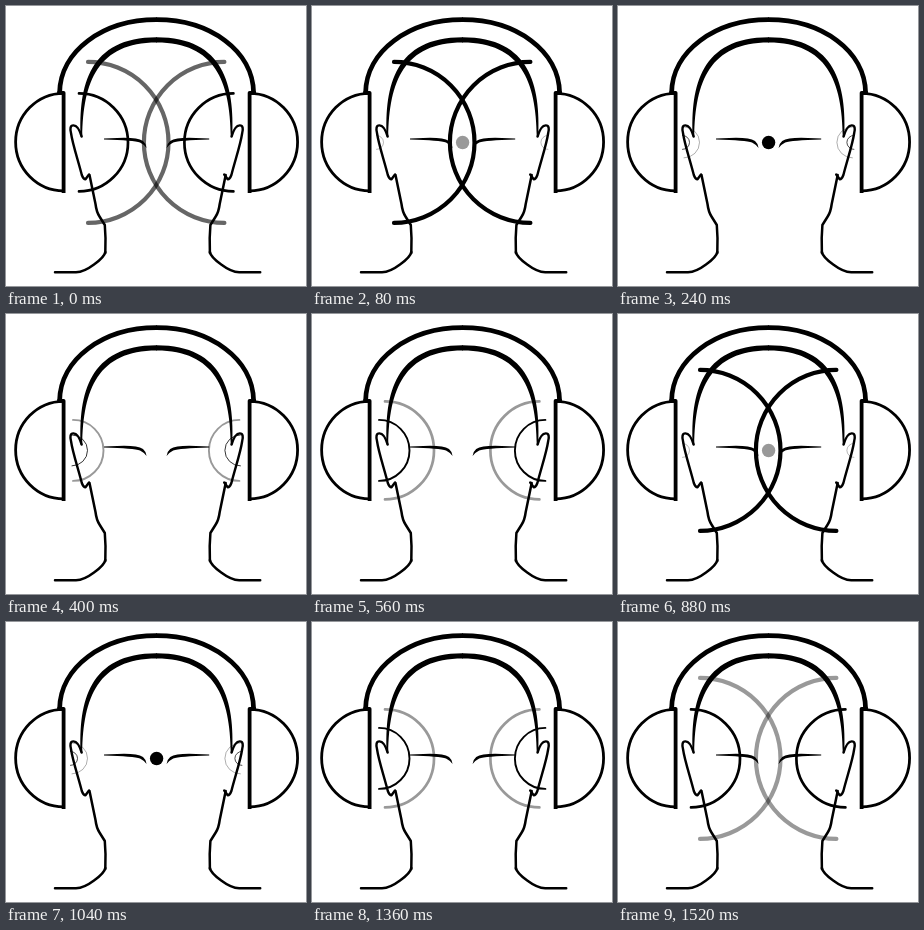
An HTML page with a canvas for the animation above (1.6 s loop, 300x280 px).

```html
<!DOCTYPE html>
<html lang="en">
<head>
<meta charset="utf-8">
<title>Sound waves</title>
<style>
  html, body { margin: 0; width: 100%; height: 100%; overflow: hidden; background: #fff; }
  canvas { display: block; }
</style>
</head>
<body>
<canvas id="stage" width="300" height="280"></canvas>
<script>
const ctx = document.getElementById('stage').getContext('2d');
const STEP = 80;
const STEPS = 10;
const HEAD_AXIS = 150.6;
const NECK_AXIS = 151.6;
const RING_AXIS = 150.2;

// Half rings leaving the left ear, from the innermost outwards.
const rings = [
  { x: 64.5, r: 7, width: 0.7 },
  { x: 66, r: 15.5, width: 0.8 },
  { x: 67, r: 30.5, width: 1.9 },
  { x: 73, r: 49, width: 2.7 },
  { x: 82, r: 80.5, width: 4.2 }
];

const skull = new Path2D('M74.8 131C72.6 80 83 31.3 150.5 31.3H151V36.5H150.5C92.5 36.5 77 75 76.4 131Z');
const brow = new Path2D('M98 132.4L118 131.8Q132 131.8 137 135Q140 137.4 140.6 142Q138 138.6 134 136.6Q128 134.4 98 133.6Z');
const ear = new Path2D('M75.6 130.5C74 125 71.5 119.5 67.5 119.4C64 119.3 64 123 65 127C66.5 138 72 154 75.8 169Q77.5 173.5 79.5 173.3L83 168.5');
const neck = new Path2D('M83.5 169L89.5 198Q90.5 206 93.5 210.5L98.8 219L99.5 232L99.3 247');
const shoulder = new Path2D('M99.3 246Q98.5 251 88 258.5Q78 266 70 266.3H49');
const band = new Path2D('M53.6 87C54 45 97 13.7 150.5 13.7H151');
const cupEdge = new Path2D('M51.5 86.8H57.6V187');
const cup = new Path2D('M57.6 87.3A48 48.8 0 0 0 57.6 184.9');

function line(path, width) {
  ctx.lineWidth = width;
  ctx.stroke(path);
}

function bothSides(axis, draw) {
  draw();
  ctx.save();
  ctx.transform(-1, 0, 0, 1, axis * 2, 0);
  draw();
  ctx.restore();
}

function drawHead() {
  ctx.fill(skull);
  ctx.fill(brow);
  ctx.lineCap = 'butt';
  line(band, 4.8);
  line(cupEdge, 3.8);
  line(cup, 2.8);
  ctx.lineCap = 'round';
  line(ear, 2.4);
}

function drawNeck() {
  line(neck, 2.5);
  line(shoulder, 2.5);
}

function drawRing(ring, alpha) {
  ctx.globalAlpha = alpha;
  ctx.lineWidth = ring.width;
  ctx.beginPath();
  ctx.arc(ring.x, 136.4, ring.r, -Math.PI / 2, Math.PI / 2);
  ctx.stroke();
}

function render(time) {
  const tick = Math.floor(time / STEP) % STEPS + 1;
  const solid = (Math.floor(tick / 2) + 3) % rings.length;
  const next = (solid + 1) % rings.length;
  const fade = tick % 2 ? 0.6 : 0.4;

  ctx.globalAlpha = 1;
  ctx.fillStyle = '#fff';
  ctx.fillRect(0, 0, 300, 280);
  ctx.fillStyle = ctx.strokeStyle = '#000';
  ctx.lineJoin = 'round';

  bothSides(HEAD_AXIS, drawHead);
  bothSides(NECK_AXIS, drawNeck);
  bothSides(RING_AXIS, () => {
    drawRing(rings[solid], 1);
    drawRing(rings[next], fade);
  });

  // The centre dot appears together with the innermost ring.
  const dot = solid === 0 ? 1 : next === 0 ? fade : 0;
  ctx.globalAlpha = dot;
  ctx.beginPath();
  ctx.arc(150.6, 136.5, 6.7, 0, Math.PI * 2);
  ctx.fill();
}

let start;
function loop(now) {
  start ??= now;
  render(now - start);
  requestAnimationFrame(loop);
}
render(0);
requestAnimationFrame(loop);
</script>
</body>
</html>
```
